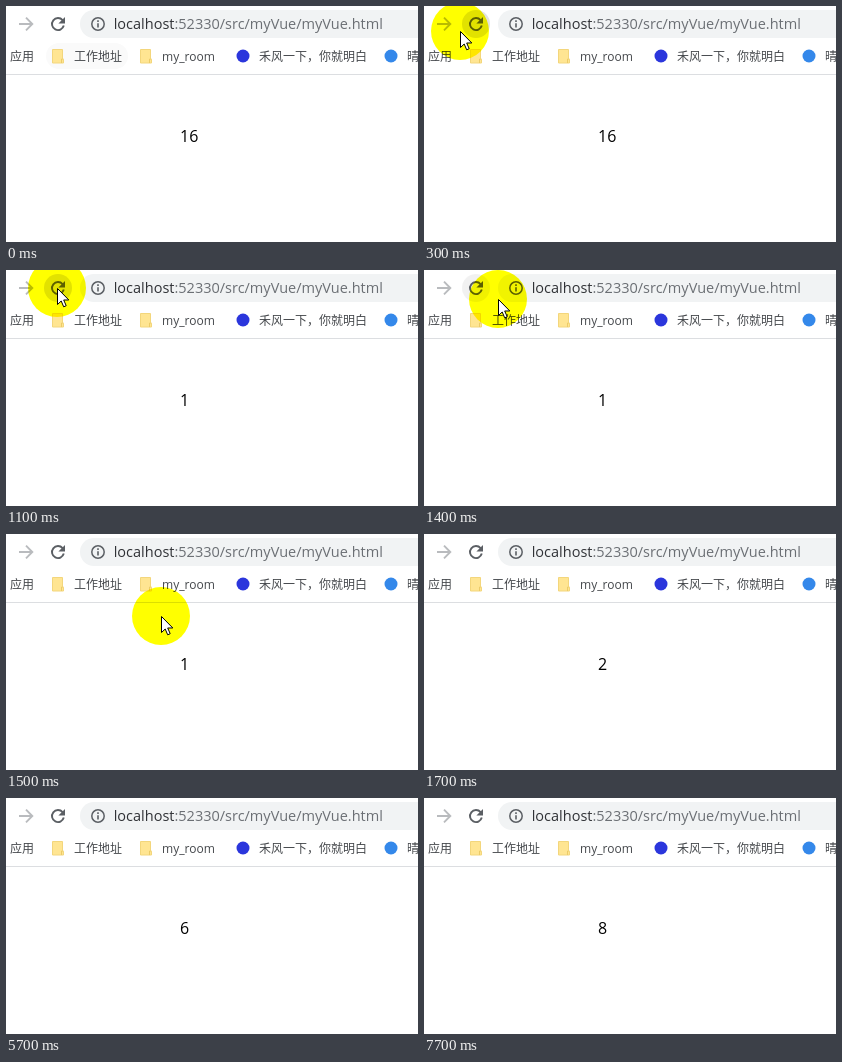
An HTML page for the animation above (8000 ms loop, 412 by 236 pixels).

```html
<!DOCTYPE html>
<html lang="zh-CN">
<head>
<meta charset="utf-8">
<title>Counter page</title>
<style>
  html, body { margin: 0; width: 100%; height: 100%; overflow: hidden; background: #fff; }
  svg { display: block; width: 412px; height: 236px; }
  text { font-family: "Open Sans", "Noto Sans CJK SC", "Noto Sans CJK", sans-serif; }
  .url { font-size: 14.5px; fill: #6b6f74; }
  .host { fill: #303236; }
  .marks { font-size: 12px; fill: #45484c; }
  .count { font-size: 16px; fill: #000; }
  .icon { fill: none; stroke: #5b5f64; stroke-width: 1.9; }
  .halo { fill: #ff0; mix-blend-mode: multiply; }

  .count g, .move, .hover, .tab { animation: 8s step-end infinite; }
  .count g { animation-name: count; }
  .move { animation-name: move; }
  .hover { animation-name: hover; }
  .tab { animation-name: tab; }

  /* one line of digits per 30px */
  @keyframes count {
    0% { transform: translateY(0); }
    8.75% { transform: translateY(-30px); }
    21.25% { transform: translateY(-60px); }
    33.75% { transform: translateY(-90px); }
    46.25% { transform: translateY(-120px); }
    58.75% { transform: translateY(-150px); }
    71.25% { transform: translateY(-180px); }
    83.75% { transform: translateY(-210px); }
    96.25% { transform: translateY(-240px); }
  }
  /* pointer sampled every 100ms, 1.25% each */
  @keyframes move {
    0% { transform: translate(330px, 300px); }
    1.25% { transform: translate(66px, 43px); }
    2.5% { transform: translate(45px, 35px); }
    3.75% { transform: translate(36px, 25px); }
    5% { transform: translate(40px, 18px); }
    6.25% { transform: translate(45px, 17px); }
    7.5% { transform: translate(48px, 18px); }
    8.75% { transform: translate(49px, 18px); }
    12.5% { transform: translate(50px, 18px); }
    13.75% { transform: translate(51px, 18px); }
    16.25% { transform: translate(57px, 20px); }
    17.5% { transform: translate(74px, 29px); }
    18.75% { transform: translate(155px, 82px); }
    20% { transform: translate(243px, 140px); }
    21.25%, 100% { transform: translate(330px, 300px); }
  }
  @keyframes hover {
    0% { opacity: 0; }
    3.75% { opacity: 1; }
    17.5% { opacity: .45; }
    18.75%, 100% { opacity: 0; }
  }
  @keyframes tab {
    0% { opacity: 1; }
    1.25%, 100% { opacity: 0; }
  }
</style>
</head>
<body>
<svg viewBox="0 0 412 236">
  <defs>
    <clipPath id="slot"><rect x="160" y="118" width="60" height="24"/></clipPath>
    <g id="folder">
      <path d="M.5 .5h10v9l1 1v3.5H.5z" fill="#ffe592" stroke="#f3d67c"/>
      <path d="M9.5 14v-4h2" fill="none" stroke="#eccb68"/>
    </g>
  </defs>
  <rect width="412" height="236" fill="#fff"/>

  <rect x="74" y="4" width="360" height="28" rx="14" fill="#f1f3f4"/>
  <path class="icon" d="M13 18h13M20 11.7l6.3 6.3l-6.3 6.3" style="stroke:#b9bbbe"/>
  <circle class="hover" cx="52" cy="18" r="14" fill="#e2e2e2"/>
  <path class="icon" d="M56.6 14.2A6 6 0 1 0 57.8 19.6"/>
  <path d="M59 11v6.6h-6.6z" fill="#5b5f64"/>
  <circle class="icon" cx="92" cy="18" r="6.2" style="stroke-width:1.5"/>
  <path class="icon" d="M92 17.2v4.3M92 14.2v1.7" style="stroke-width:1.6"/>
  <text class="url" x="107.7" y="23"><tspan class="host">localhost</tspan>:52330/src/myVue/myVue.html</text>

  <rect class="tab" x="40" y="37" width="82" height="26" rx="13" fill="#fafafa"/>
  <g class="marks">
    <text x="4" y="55">应用</text>
    <use href="#folder" x="46" y="43"/>
    <text x="68" y="55">工作地址</text>
    <use href="#folder" x="134" y="43"/>
    <text x="156" y="55">my_room</text>
    <circle cx="237" cy="50" r="6.5" fill="#2b36dc"/>
    <text x="253" y="55">禾风一下，你就明白</text>
    <circle cx="385" cy="50" r="6.5" fill="#3488ea"/>
    <text x="401" y="55">晴</text>
  </g>
  <path d="M0 68.5h412" stroke="#dcdee1"/>

  <g class="count" clip-path="url(#slot)">
    <g>
      <text x="174" y="136">16</text>
      <text x="174" y="166">1</text>
      <text x="174" y="196">2</text>
      <text x="174" y="226">3</text>
      <text x="174" y="256">4</text>
      <text x="174" y="286">5</text>
      <text x="174" y="316">6</text>
      <text x="174" y="346">7</text>
      <text x="174" y="376">8</text>
    </g>
  </g>

  <circle class="halo move" r="29"/>
  <g class="move">
    <path d="M.5 .5v16l3.7-3.5l2.5 5.8l2.5-1.1l-2.5-5.7h5.1z" fill="#fff" stroke="#000"/>
  </g>
</svg>
</body>
</html>
```
